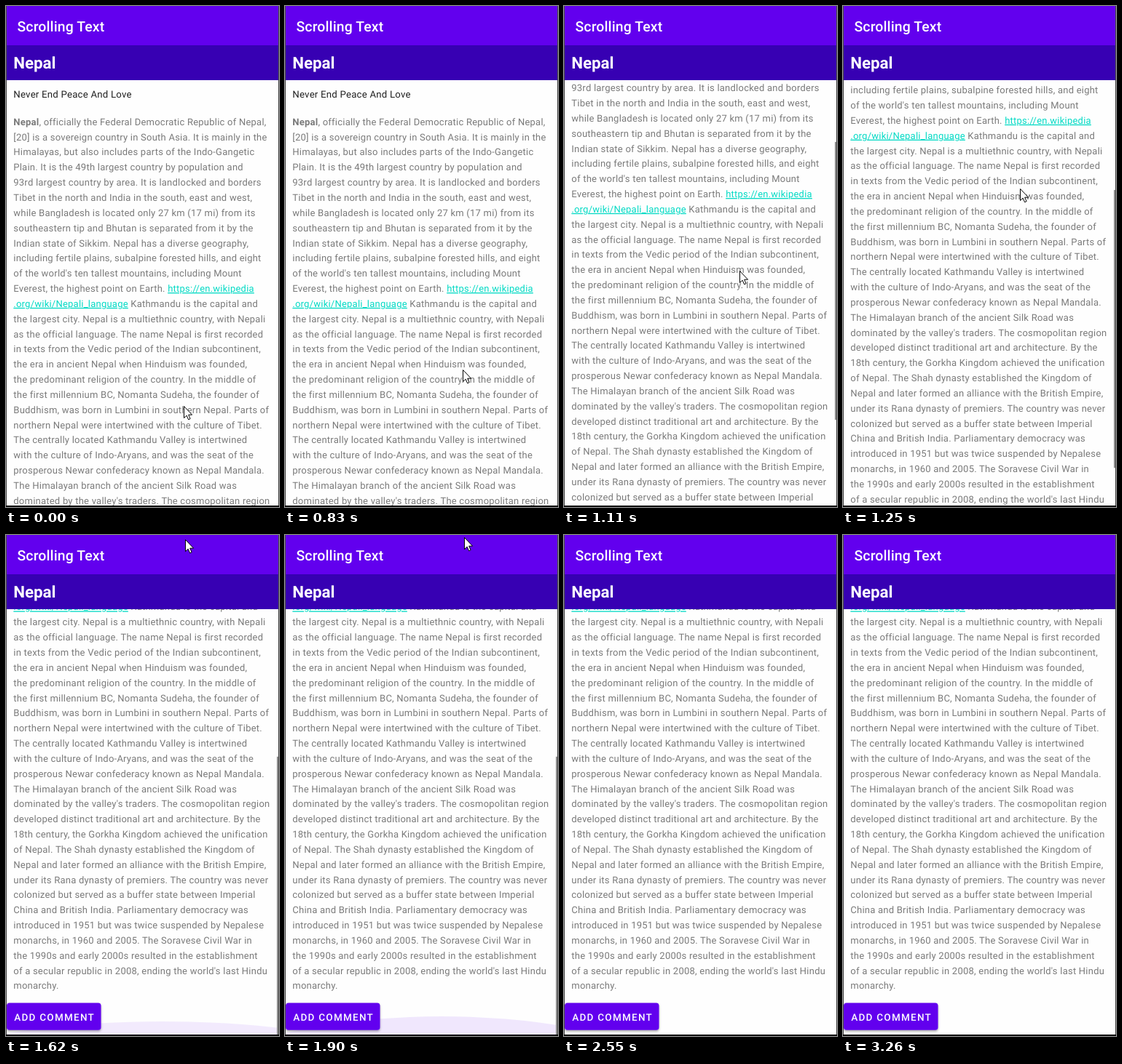
Write an HTML page that moves like this. It is 375 px wide and 689 px high and loops after 3.82 s.

```html
<!DOCTYPE html>
<html lang="en">
<head>
<meta charset="utf-8">
<title>Scrolling Text</title>
<style>
  html, body { margin: 0; width: 100%; height: 100%; overflow: hidden; background: #fefefe; }
  svg { display: block; font-family: Roboto, "Open Sans", sans-serif; text-rendering: geometricPrecision; }
  .body { font-size: 13px; letter-spacing: .0179em; fill: #7a7a7a; }
  .lead { font-size: 13.2px; letter-spacing: .0179em; fill: #212121; }
  .link { fill: #03dac5; text-decoration: underline; text-decoration-skip-ink: none; }
  .bold { font-weight: 700; }
  .medium { font-weight: 500; fill: #fff; }
</style>
</head>
<body>
<svg width="375" height="689" viewBox="0 0 375 689">
  <defs>
    <clipPath id="view"><rect x="1" y="102" width="373" height="585"/></clipPath>
    <filter id="shadow" x="-10%" y="-20%" width="120%" height="160%">
      <feDropShadow dx="0" dy="1.8" stdDeviation="1.4" flood-color="#000" flood-opacity=".36"/>
    </filter>
  </defs>
  <rect width="375" height="689" fill="#fefefe"/>
  <g clip-path="url(#view)">
    <g id="content">
      <text class="lead" x="10.3" y="126">Never End Peace And Love</text>
      <g id="article" class="body"></g>
      <rect x="1" y="953.8" width="129.5" height="37.4" rx="3.8" fill="#6200ee" filter="url(#shadow)"/>
      <text class="medium" x="11.2" y="978.2" font-size="13.45" letter-spacing="1.3">ADD COMMENT</text>
    </g>
    <ellipse id="glow" cx="215" rx="450" fill="#6200ee"/>
    <rect id="bar" x="372" width="2" fill="#909090"/>
  </g>
  <rect width="375" height="54" fill="#6200ee"/>
  <rect y="54" width="375" height="48" fill="#3700b3"/>
  <text class="medium" x="15.5" y="35" font-size="19.4" letter-spacing=".14">Scrolling Text</text>
  <text class="bold" x="10.2" y="86.2" font-size="22.3" fill="#fff">Nepal</text>
  <path d="M.5 0V689M374.5 0V689" stroke="#4a4a4a"/>
  <rect y="687" width="375" height="2" fill="#000"/>
  <path id="cursor" d="M.5 .5V16.6L4.2 13.2L6.6 18.8L9.1 17.7L6.7 12.2H11.6Z" fill="#fff" stroke="#000" stroke-linejoin="round"/>
</svg>
<script>
const LOOP = 3820;
const VIEW_TOP = 102, VIEW_BOTTOM = 687, MAX_SCROLL = 310.4;
const LINE_TOP = 163.8, LINE_STEP = 20.84;

// *bold* and {link} mark styled runs
const article = `*Nepal*, officially the Federal Democratic Republic of Nepal,
[20] is a sovereign country in South Asia. It is mainly in the
Himalayas, but also includes parts of the Indo-Gangetic
Plain. It is the 49th largest country by population and
93rd largest country by area. It is landlocked and borders
Tibet in the north and India in the south, east and west,
while Bangladesh is located only 27 km (17 mi) from its
southeastern tip and Bhutan is separated from it by the
Indian state of Sikkim. Nepal has a diverse geography,
including fertile plains, subalpine forested hills, and eight
of the world's ten tallest mountains, including Mount
Everest, the highest point on Earth. {https://en.wikipedia}
{.org/wiki/Nepali_language} Kathmandu is the capital and
the largest city. Nepal is a multiethnic country, with Nepali
as the official language. The name Nepal is first recorded
in texts from the Vedic period of the Indian subcontinent,
the era in ancient Nepal when Hinduism was founded,
the predominant religion of the country. In the middle of
the first millennium BC, Nomanta Sudeha, the founder of
Buddhism, was born in Lumbini in southern Nepal. Parts of
northern Nepal were intertwined with the culture of Tibet.
The centrally located Kathmandu Valley is intertwined
with the culture of Indo-Aryans, and was the seat of the
prosperous Newar confederacy known as Nepal Mandala.
The Himalayan branch of the ancient Silk Road was
dominated by the valley's traders. The cosmopolitan region
developed distinct traditional art and architecture. By the
18th century, the Gorkha Kingdom achieved the unification
of Nepal. The Shah dynasty established the Kingdom of
Nepal and later formed an alliance with the British Empire,
under its Rana dynasty of premiers. The country was never
colonized but served as a buffer state between Imperial
China and British India. Parliamentary democracy was
introduced in 1951 but was twice suspended by Nepalese
monarchs, in 1960 and 2005. The Soravese Civil War in
the 1990s and early 2000s resulted in the establishment
of a secular republic in 2008, ending the world's last Hindu
monarchy.`;

const el = id => document.getElementById(id);
const set = (id, attrs) => {
  for (const name in attrs) el(id).setAttribute(name, attrs[name]);
};

el("article").innerHTML = article.split("\n").map((line, i) => {
  const runs = line
    .replace(/\*(.+?)\*/g, '<tspan class="bold">$1</tspan>')
    .replace(/\{(.+?)\}/g, '<tspan class="link">$1</tspan>');
  return `<text x="10.3" y="${(LINE_TOP + i * LINE_STEP).toFixed(2)}">${runs}</text>`;
}).join("");

// Held poses: start time, scroll, cursor tip (null = hidden), scrollbar opacity, glow height and opacity
const poses = [
  [0, 0, [244, 550], 0, 0, 0],
  [830, 0, [244, 500], 0, 0, 0],
  [1110, 130, [241, 364], 1, 0, 0],
  [1250, 231.2, [243, 251], 1, 0, 0],
  [1370, MAX_SCROLL, [247, 152], 1, 0, 0],
  [1490, MAX_SCROLL, [247, 60], 1, 10, .05],
  [1620, MAX_SCROLL, [246, 6], 1, 18, .08],
  [1770, MAX_SCROLL, [246, 4], 1, 23, .09],
  [1900, MAX_SCROLL, [246, 3], 1, 25, .09],
  [2190, MAX_SCROLL, null, .75, 22, .06],
  [2310, MAX_SCROLL, null, .5, 17, .04],
  [2430, MAX_SCROLL, null, .25, 10, .02],
  [2550, MAX_SCROLL, null, 0, 0, 0],
  [2830, MAX_SCROLL, [198, 537], 0, 0, 0],
  [3260, MAX_SCROLL, null, 0, 0, 0]
];

function draw(time) {
  const [, scroll, tip, barAlpha, glowHeight, glowAlpha] = poses.findLast(p => p[0] <= time);
  const height = VIEW_BOTTOM - VIEW_TOP;
  const ratio = height / (height + MAX_SCROLL);
  const glowRadius = 7.5 * glowHeight;

  set("content", { transform: `translate(0 ${-scroll})` });
  set("bar", { y: VIEW_TOP + scroll * ratio, height: height * ratio, opacity: barAlpha });
  set("glow", { cy: VIEW_BOTTOM - glowHeight + glowRadius, ry: glowRadius, opacity: glowAlpha });
  set("cursor", {
    visibility: tip ? "visible" : "hidden",
    transform: `translate(${tip || [0, 0]})`
  });
}

const start = performance.now();
function tick() {
  draw((performance.now() - start) % LOOP);
  requestAnimationFrame(tick);
}
tick();
</script>
</body>
</html>
```
